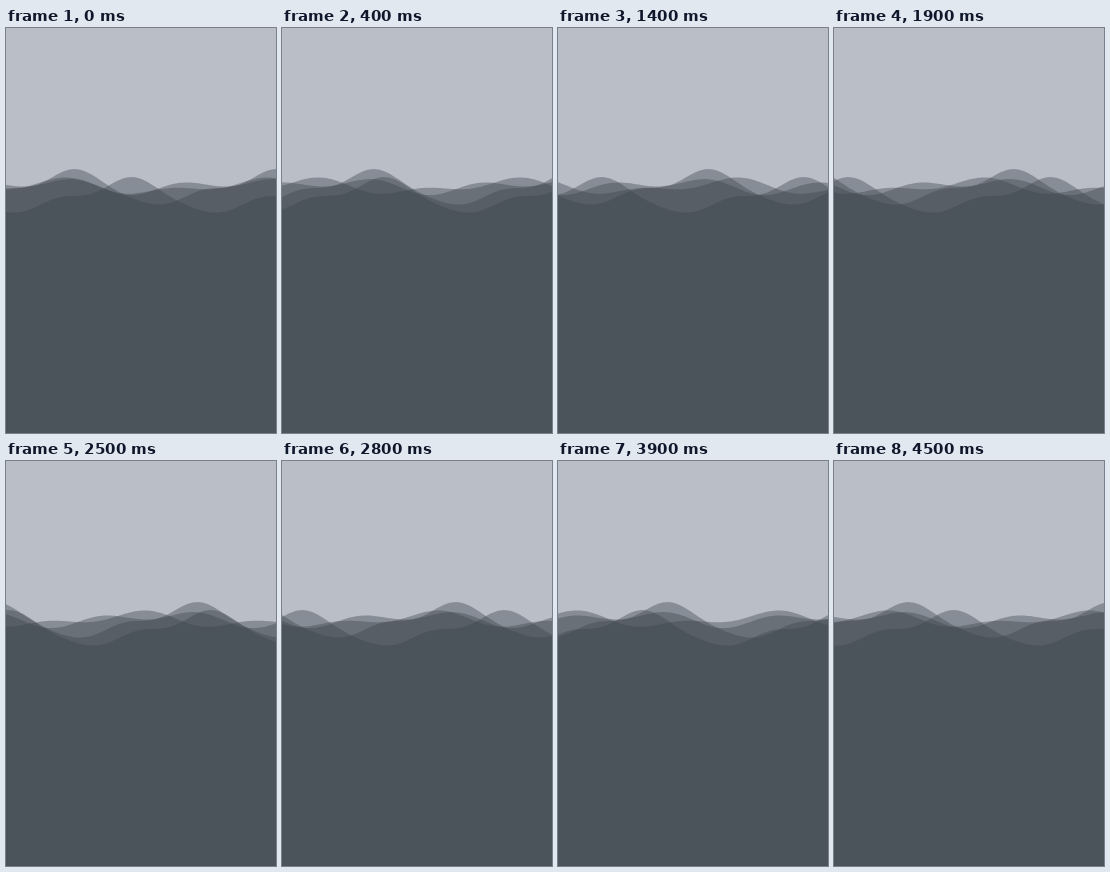
Write an HTML page that moves like this. It is 270 px wide and 405 px high and loops after 4.6 s.

```html
<!DOCTYPE html>
<html lang="en">
<head>
<meta charset="utf-8">
<title>Waves</title>
<style>
  html, body { margin: 0; width: 100%; height: 100%; overflow: hidden; background: #b9bec7; }
  svg { display: block; width: 100%; height: 100%; }
  path { fill: #3d454c; fill-opacity: .4; }
</style>
</head>
<body>
<svg id="stage" viewBox="0 0 270 405" preserveAspectRatio="none"></svg>
<script>
const WIDTH = 270, HEIGHT = 405;
const PERIOD = 202;
const STEP_MS = 100;
const STEPS = 46;
const SHIFT = 5.85; // horizontal travel per step

// Harmonics of the wave shapes: [amplitude, phase]
const swell = [[14.9, 2.89], [4.4, -2.25], [1.9, 2.93]];
const ripple = [[5.7, 3], [3.9, -2.57]];
const chop = [[4.7, 2.09], [4.7, -2.87]];

const waves = [
  { shape: chop, level: 158, crest: 67, dir: 1 },
  { shape: ripple, level: 158.7, crest: 54, dir: -1 },
  { shape: swell, level: 168.2, crest: 124, dir: -1 },
  { shape: swell, level: 160.2, crest: 67, dir: 1 },
];

function surface({ shape, level, crest, dir }, x, travel) {
  const angle = (x - crest - dir * travel) / PERIOD * 2 * Math.PI;
  return shape.reduce(
    (y, [amplitude, phase], k) => y + amplitude * Math.cos((k + 1) * angle - phase), level);
}

const stage = document.getElementById('stage');
for (const wave of waves) {
  wave.node = document.createElementNS('http://www.w3.org/2000/svg', 'path');
  stage.append(wave.node);
}

function draw(ms) {
  const step = Math.floor(ms / STEP_MS) % STEPS;
  const travel = Math.min(step, STEPS - step) * SHIFT; // there and back
  for (const wave of waves) {
    let d = `M0,${HEIGHT}`;
    for (let x = 0; x <= WIDTH; x += 2) d += `L${x},${surface(wave, x, travel).toFixed(2)}`;
    wave.node.setAttribute('d', `${d}V${HEIGHT}Z`);
  }
}

const start = performance.now();
function tick() {
  draw(performance.now() - start);
  requestAnimationFrame(tick);
}
tick();
</script>
</body>
</html>
```
